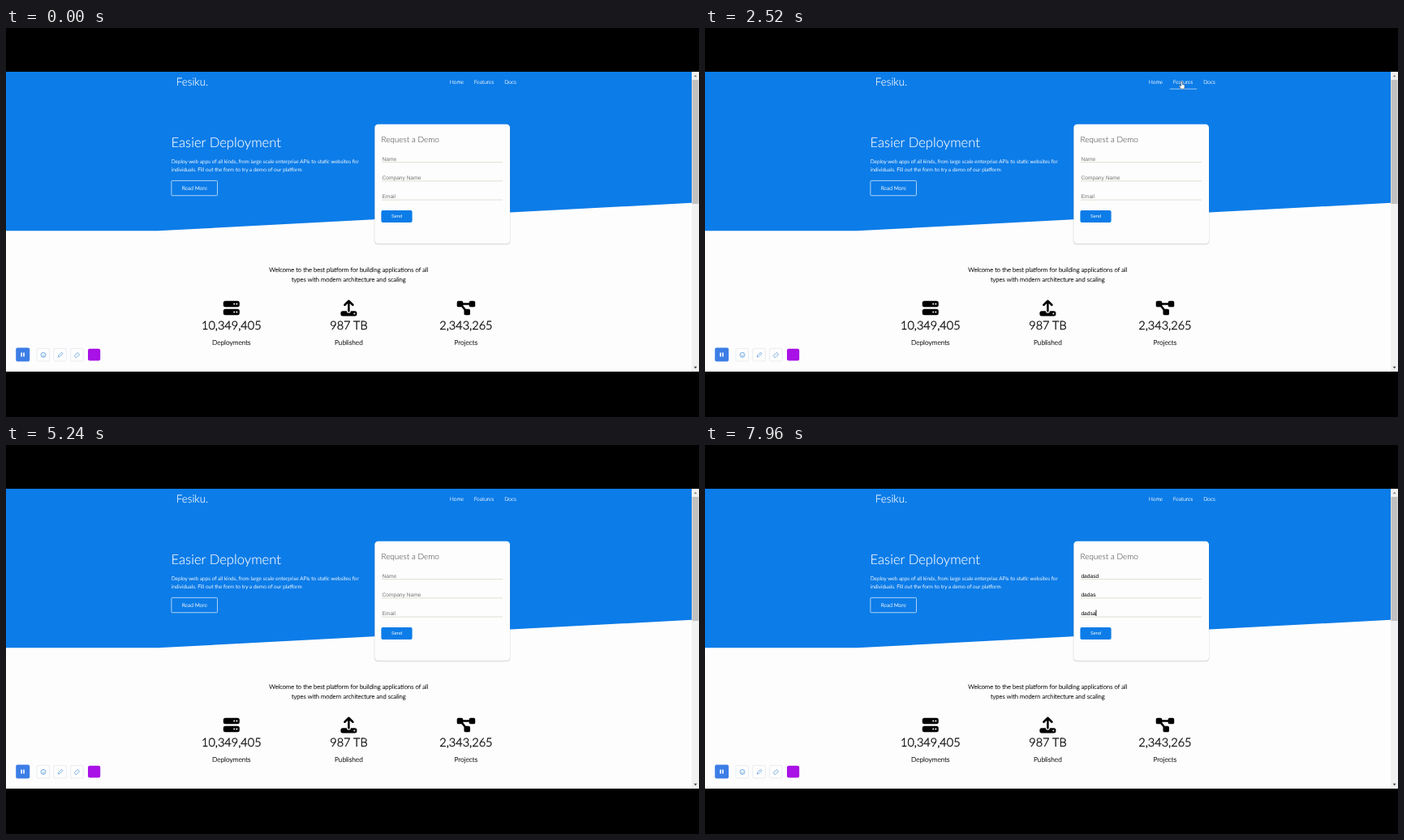
These frames come from a looping animation (854 px wide and 480 px high, 8 s). An HTML page:

```html
<!DOCTYPE html>
<html lang="en">
<head>
<meta charset="utf-8">
<title>Easier Deployment</title>
<style>
  html, body { margin: 0; height: 100%; overflow: hidden; background: #000; }
  svg { display: block; width: 100vw; height: 100vh; }
  text { font: 300 6.67px Lato, sans-serif; text-rendering: geometricPrecision; }
  .light { fill: #fff; }
  .light text { stroke: #fff; stroke-width: .14px; }
  .logo { font-size: 13.34px; }
  .h1 { font-size: 16.68px; }
  .h2 { font-size: 10px; fill: #333; }
  .body { font-size: 6.5px; }
  .mid { text-anchor: middle; }
  .stats text { stroke: #000; stroke-width: .2px; }
  .lead { font-size: 7.62px; }
  .stats .number { font-size: 14.5px; stroke-width: .35px; }
  .label { font-size: 8.34px; }
  .field, .send { font-family: "Liberation Sans", Arial, sans-serif; font-weight: 400; }
  .send { font-size: 5.56px; }
</style>
</head>
<body>
<svg viewBox="0 0 854 480">
  <rect width="854" height="480"/>
  <rect y="54" width="854" height="370" fill="#fdfdfd"/>
  <path d="M0 54H845V215.8L187 250.3H0Z" fill="#0c7ce8"/>

  <g class="light">
    <text class="logo" x="209.8" y="71.3">Fesiku.</text>
    <text x="546.8" y="68.8">Home</text>
    <text x="576.8" y="68.8">Features</text>
    <text x="614.2" y="68.8">Docs</text>
    <text class="h1" x="203.5" y="147">Easier Deployment</text>
    <text class="body" x="203.7" y="166.6">Deploy web apps of all kinds, from large scale enterprise APIs to static websites for</text>
    <text class="body" x="203.7" y="176.9">individuals. Fill out the form to try a demo of our platform</text>
    <text class="mid" x="232.3" y="199.8">Read More</text>
    <rect x="203.9" y="188.4" width="56.6" height="18.4" rx="1" fill="none" stroke="#d6e8fb" stroke-width=".8"/>
  </g>
  <path id="hover" fill="none" stroke="#a9d0f7" stroke-width=".9"/>

  <rect x="453.6" y="119.6" width="168" height="148" rx="4.6" fill="#777" opacity=".2"/>
  <rect x="454.4" y="118.8" width="166.6" height="147" rx="4.2" fill="#fdfdfd"/>
  <text class="h2" x="462.4" y="141.3">Request a Demo</text>
  <path d="M463 165.6H612M463 188.8H612M463 212.1H612" stroke="#d8d8c8" stroke-width=".8"/>
  <g id="fields"></g>
  <path id="caret" stroke="#000" stroke-width=".9"/>
  <rect x="462.4" y="225" width="38.2" height="15" rx="2" fill="#0c7ce8"/>
  <text class="send mid light" x="481.5" y="234.4">Send</text>

  <g class="stats mid">
    <text class="lead" x="422.3" y="300.6">Welcome to the best platform for building applications of all</text>
    <text class="lead" x="422.3" y="312.7">types with modern architecture and scaling</text>
    <text class="number" x="277.8" y="372.4">10,349,405</text>
    <text class="number" x="422.4" y="372.4">987 TB</text>
    <text class="number" x="566.9" y="372.4">2,343,265</text>
    <text class="label" x="277.8" y="391.4">Deployments</text>
    <text class="label" x="422.4" y="391.4">Published</text>
    <text class="label" x="566.9" y="391.4">Projects</text>
  </g>

  <g transform="translate(267.8 335.5) scale(.0391)">
    <rect y="32" width="512" height="192" rx="64"/>
    <rect y="288" width="512" height="192" rx="64"/>
    <g fill="#fdfdfd">
      <circle cx="344" cy="128" r="25"/><circle cx="424" cy="128" r="25"/>
      <circle cx="344" cy="384" r="25"/><circle cx="424" cy="384" r="25"/>
    </g>
  </g>
  <g transform="translate(412.4 335.5) scale(.0391)">
    <path d="M64 352H192a64 64 0 0 0 128 0H448a64 64 0 0 1 64 64v32a64 64 0 0 1-64 64H64a64 64 0 0 1-64-64v-32a64 64 0 0 1 64-64Z"/>
    <path d="M256 352V40M128 160L256 32L384 160" fill="none" stroke="#000" stroke-width="64" stroke-linecap="round" stroke-linejoin="round"/>
    <circle cx="432" cy="432" r="25" fill="#fdfdfd"/>
  </g>
  <g transform="translate(555.7 335.5) scale(.0391)">
    <path d="M96 128H480M110 120L300 370" fill="none" stroke="#000" stroke-width="64"/>
    <rect y="32" width="192" height="192" rx="48"/>
    <rect x="384" y="32" width="192" height="192" rx="48"/>
    <rect x="224" y="288" width="192" height="192" rx="48"/>
  </g>

  <rect x="845" y="54" width="9" height="370" fill="#f1f1f1"/>
  <rect x="845.5" y="64" width="8" height="153" fill="#c1c1c1"/>
  <path d="M847.6 60.2l2-2.4 2 2.4Z" fill="#8a8a8a"/>
  <path d="M847.6 417.8l2 2.4 2-2.4Z" fill="#444"/>

  <rect x="12.2" y="394.6" width="17" height="16.8" rx="2" fill="#3c7de6"/>
  <path d="M19.1 400.6v5M22 400.6v5" stroke="#fff" stroke-width="1.6"/>
  <g fill="#fdfdfd" stroke="#e3e8ee" stroke-width=".8">
    <rect x="38" y="395.4" width="15.6" height="15.6" rx="1.5"/>
    <rect x="58.8" y="395.4" width="15.6" height="15.6" rx="1.5"/>
    <rect x="79.6" y="395.4" width="15.6" height="15.6" rx="1.5"/>
  </g>
  <g fill="none" stroke="#6ba6de" stroke-width=".9">
    <circle cx="46" cy="403.4" r="3"/>
    <path d="M44.5 404.2q1.5 1.6 3 0M44.8 402.2v.7M47.2 402.2v.7"/>
    <path d="M64.2 406l.5-2 3.8-3.8 1.5 1.5-3.8 3.8Z"/>
    <path d="M84.3 404.3l3.8-3.8 2.5 2.3-3.8 3.8h-1Z"/>
  </g>
  <rect x="101" y="395.8" width="15.2" height="14.6" rx="2" fill="#a812e6"/>

  <path id="arrow" d="M0 0V7.4L1.7 5.8L2.8 8.3L4 7.8L2.9 5.4H5.2Z" fill="#fff" stroke="#333" stroke-width=".45"/>
  <path id="hand" d="M-.7 0q.8-.9 1.5 0V3.6l2.4.6q.8.3.7 1.2L3.3 9H-1L-3 5.6q.3-1 1.2-.5l1.1.9Z" fill="#fff" stroke="#333" stroke-width=".45"/>
</svg>
<script>
const LOOP = 8000, FIRST_CLICK = 5430, FIRST_KEY = 5690, KEY_GAP = 130;
const byId = id => document.getElementById(id);

// left edge, right edge of each menu link
const links = [[542.8, 568.2], [572.8, 606.2], [610.2, 633]];

// time, x, y of the pointer
const route = [
  [900, 470, 230], [1520, 538, 80], [1850, 555, 66], [2200, 560, 66], [2450, 587, 66],
  [2800, 590, 66], [3150, 621, 67], [3500, 621, 67], [3880, 616, 78], [4500, 530, 160]
];

const fields = [
  { hint: "Name", value: "dadasd", y: 163.5 },
  { hint: "Company Name", value: "dadas", y: 186.7 },
  { hint: "Email", value: "dadsa", y: 209.6 }
];

// One steady run of keys, with a Tab between fields.
let keyTime = FIRST_KEY;
fields.forEach((field, i) => {
  field.focus = i ? keyTime - KEY_GAP : FIRST_CLICK;
  field.typing = keyTime;
  keyTime += (field.value.length + 1) * KEY_GAP;
  field.blur = i < fields.length - 1 ? keyTime - KEY_GAP : LOOP;
  field.node = document.createElementNS("http://www.w3.org/2000/svg", "text");
  field.node.setAttribute("class", "field");
  field.node.setAttribute("x", 463.4);
  field.node.setAttribute("y", field.y);
  byId("fields").append(field.node);
});

function pointerAt(t) {
  const next = route.findIndex(point => point[0] > t);
  if (next < 1) return null;
  const [t0, x0, y0] = route[next - 1], [t1, x1, y1] = route[next];
  const p = (t - t0) / (t1 - t0), ease = p * p * (3 - 2 * p);
  return [x0 + (x1 - x0) * ease, y0 + (y1 - y0) * ease];
}

function place(node, point, visible) {
  node.style.display = visible ? "" : "none";
  if (visible) node.setAttribute("transform", `translate(${point})`);
}

function drawPointer(t) {
  const point = pointerAt(t);
  const link = point && point[1] < 75 && links.find(([left, right]) => point[0] > left && point[0] < right);
  place(byId("arrow"), point, point && !link);
  place(byId("hand"), point, link);
  byId("hover").setAttribute("d", link ? `M${link[0]} 75.2H${link[1]}` : "");
}

function drawFields(t) {
  let caret = "";
  for (const { node, hint, value, y, focus, blur, typing } of fields) {
    const count = Math.min(value.length, Math.max(0, Math.floor((t - typing) / KEY_GAP) + 1));
    node.textContent = count ? value.slice(0, count) : hint;
    node.setAttribute("fill", count ? "#000" : "#757575");
    const lastEvent = count ? typing + (count - 1) * KEY_GAP : focus;
    if (t >= focus && t < blur && (t - lastEvent) % 1000 < 500) {
      const x = 463.8 + (count ? node.getComputedTextLength() : 0);
      caret = `M${x} ${y - 6}v7.4`;
    }
  }
  byId("caret").setAttribute("d", caret);
}

const start = performance.now();
function frame() {
  const t = (performance.now() - start) % LOOP;
  drawPointer(t);
  drawFields(t);
  requestAnimationFrame(frame);
}
frame();
</script>
</body>
</html>
```
